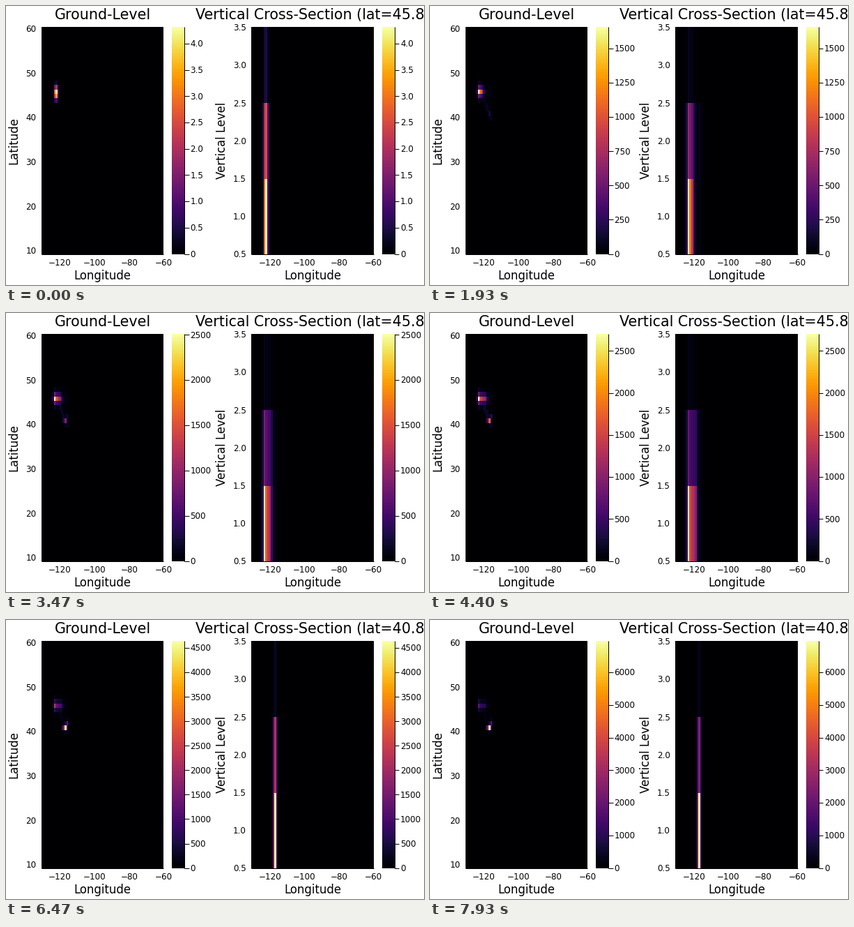
Animation of 600 by 400 pixels, one loop 8 s. Source, as a matplotlib script:

```python
import math

import numpy as np
import matplotlib.pyplot as plt
from matplotlib.animation import FuncAnimation

W, H, DPI = 600, 400, 100
STEPS, LOOP = 120, 8000
FRAMES = 2 * STEPS
TOP, BOTTOM = 30.4, 355.6
ROWS, COLS = 51, 69
LAT0 = 9.8
NORTH, SOUTH = 36, 31          # grid rows of the two emitters
WEST, EAST = 7, 13             # grid columns of the two emitters
TITLE, LABEL, TICK = 20.7, 16.5, 11.9

row, col = np.mgrid[:ROWS, :COLS].astype(float)


def smooth_curve(knots, values):
    """Cubic Hermite curve through the given points."""
    x, y = np.array(knots, float), np.array(values, float)
    slope = np.gradient(y, x)

    def at(t):
        k = min(max(np.searchsorted(x, t) - 1, 0), len(x) - 2)
        h = x[k + 1] - x[k]
        u = (t - x[k]) / h
        return ((1 + 2 * u) * (1 - u) ** 2 * y[k] + u * (1 - u) ** 2 * h * slope[k]
                + u * u * (3 - 2 * u) * y[k + 1] + u * u * (u - 1) * h * slope[k + 1])
    return at


north_peak = smooth_curve([0, 18, 40, 66, 86, 119], [4.31, 1066, 2145, 2700, 2500, 2050])
south_peak = smooth_curve([0, 18, 40, 66, 86, 108, 119],
                          [0, 40, 400, 1750, 3505, 5817, 6955])


def puff(c, r, across, along):
    return np.exp(-across * (col - c) ** 2 - along * (row - r) ** 2)


def stream(i):
    """Steady plume that decays near its source while its tail reaches east."""
    age = np.interp(i, [18, 66], [0, 1])
    d = col - WEST
    tail = 0.45 / (1 + np.exp(2.5 * (d - 2 - 2.6 * age)))
    core = 0.55 * np.exp(-np.maximum(d, 0) / (1.5 - 0.8 * age))
    upwind = np.exp(1.95 * np.minimum(d, 0))
    spread = np.exp(-1.1 * np.abs(row - NORTH) ** 1.3)
    return (tail + core) * upwind * spread


def ground(i):
    fresh = math.exp(-i / 4)
    north = fresh * puff(7.7, NORTH - 0.25, 1, 0.5) + (1 - fresh) * stream(i)
    south = puff(12.85, SOUTH, 1.6, 3) + 0.25 * puff(14, SOUTH + 1, 1.5, 1.6)
    drift = np.exp(-((col - 8.5 - 0.9 * (NORTH - row)) / 1.3) ** 2)
    drift[(row >= NORTH) | (row < SOUTH - 1)] = 0
    haze = 3 * drift + 1.8 * puff(13, NORTH, 0.4, 0.2)
    return np.maximum.reduce([haze * min(i, 66),
                              north / north.max() * north_peak(i),
                              south / south.max() * south_peak(i)])


def section(i, base, northern):
    if northern:
        lift = np.interp(i, [0, 18, 66], [.6, .45, .3])
    else:
        lift = np.interp(i, [77, 86, 119], [.6, .55, .36])
    aloft = lift * base.max() * (base / base.max()) ** 0.65
    return np.array([base, aloft, aloft * np.interp(i, [0, 18], [.2, .13])])


fig = plt.figure(figsize=(W / DPI, H / DPI), dpi=DPI, facecolor="white")
ax = fig.add_axes([0, 0, 1, 1])
ax.axis("off")


def write(x, baseline, s, px, ha="center", **kw):
    return ax.text(x, baseline, s, fontsize=px * 72 / DPI, family="DejaVu Sans",
                   color="black", ha=ha, va="baseline", rotation_mode="anchor", **kw)


def rule(xs, ys):
    return ax.plot(xs, ys, color="black", lw=0.72, solid_capstyle="butt")[0]


def heatmap(left, right, data):
    return ax.imshow(data, cmap="inferno", origin="lower", aspect="auto",
                     interpolation="nearest", extent=(left, right, BOTTOM, TOP))


class Bar:
    """Colour scale with ticks that follow the largest value."""

    def __init__(self, left, right):
        heatmap(left, right + 0.5, np.linspace(0, 1, 256)[:, None])
        rule([right] * 2, [TOP, BOTTOM])
        self.marks = [(rule([right, right + 6.5], [0, 0]),
                       write(right + 8.4, 0, "", TICK, ha="left")) for _ in range(12)]

    def update(self, top):
        power = 10 ** math.floor(math.log10(top))
        lead = top / power
        step = power * (1 if lead > 5 else .5 if lead > 2.5 else .25)
        digits = len(f"{step:g}".partition(".")[2])
        for k, (line, text) in enumerate(self.marks):
            value = k * step
            shown = value <= top
            line.set_visible(shown)
            text.set_visible(shown)
            y = BOTTOM - value / top * (BOTTOM - TOP)
            line.set_ydata([y, y])
            text.set_y(y + 4.3)
            text.set_text(f"{value:.{digits}f}" if k else "0")


def panel(left, right, data, ylabel, ylabel_x, yticks):
    image = heatmap(left, right, data)
    rule([left, left], [TOP, BOTTOM])
    rule([left, right], [BOTTOM, BOTTOM])
    for lon in range(-120, -59, 20):
        write(left + 26.4 + (lon + 120) * 2.48, 371.8, f"\u2212{-lon}", TICK)
    for y, s in yticks:
        write(left - 7.6, y + 4.3, s, TICK, ha="right")
    write((left + right) / 2, 392, "Longitude", LABEL)
    write(ylabel_x, (TOP + BOTTOM) / 2, ylabel, LABEL, rotation=90)
    return image


lat_ticks = [(33 + (60 - lat) * 6.36, str(lat)) for lat in range(10, 61, 10)]
level_ticks = [(BOTTOM - k * 54.1, f"{0.5 + k / 2:.1f}") for k in range(7)]
map_image = panel(51.1, 226, np.zeros((ROWS, COLS)), "Latitude", 16.3, lat_ticks)
cut_image = panel(352.4, 528, np.zeros((3, COLS)), "Vertical Level", 315.3, level_ticks)
bars = [Bar(238, 256.1), Bar(539.6, 557.7)]
write(139, 18.6, "Ground-Level", TITLE)
cut_title = write(272.5, 18.6, "", TITLE, ha="left")
ax.set_xlim(0, W)
ax.set_ylim(H, 0)


def draw(frame):
    i = min((frame + 1) // 2, STEPS - 1)
    grid = ground(i)
    northern = north_peak(i) >= south_peak(i)
    cut_row = NORTH if northern else SOUTH
    map_image.set_data(grid)
    cut_image.set_data(section(i, grid[cut_row], northern))
    cut_title.set_text(f"Vertical Cross-Section (lat={LAT0 + cut_row:.1f})")
    for image, bar in zip((map_image, cut_image), bars):
        image.set_clim(0, grid.max())
        bar.update(grid.max())
    return []


anim = FuncAnimation(fig, draw, frames=FRAMES, interval=LOOP / FRAMES,
                     repeat=True, repeat_delay=0, blit=False)
plt.show()
```
